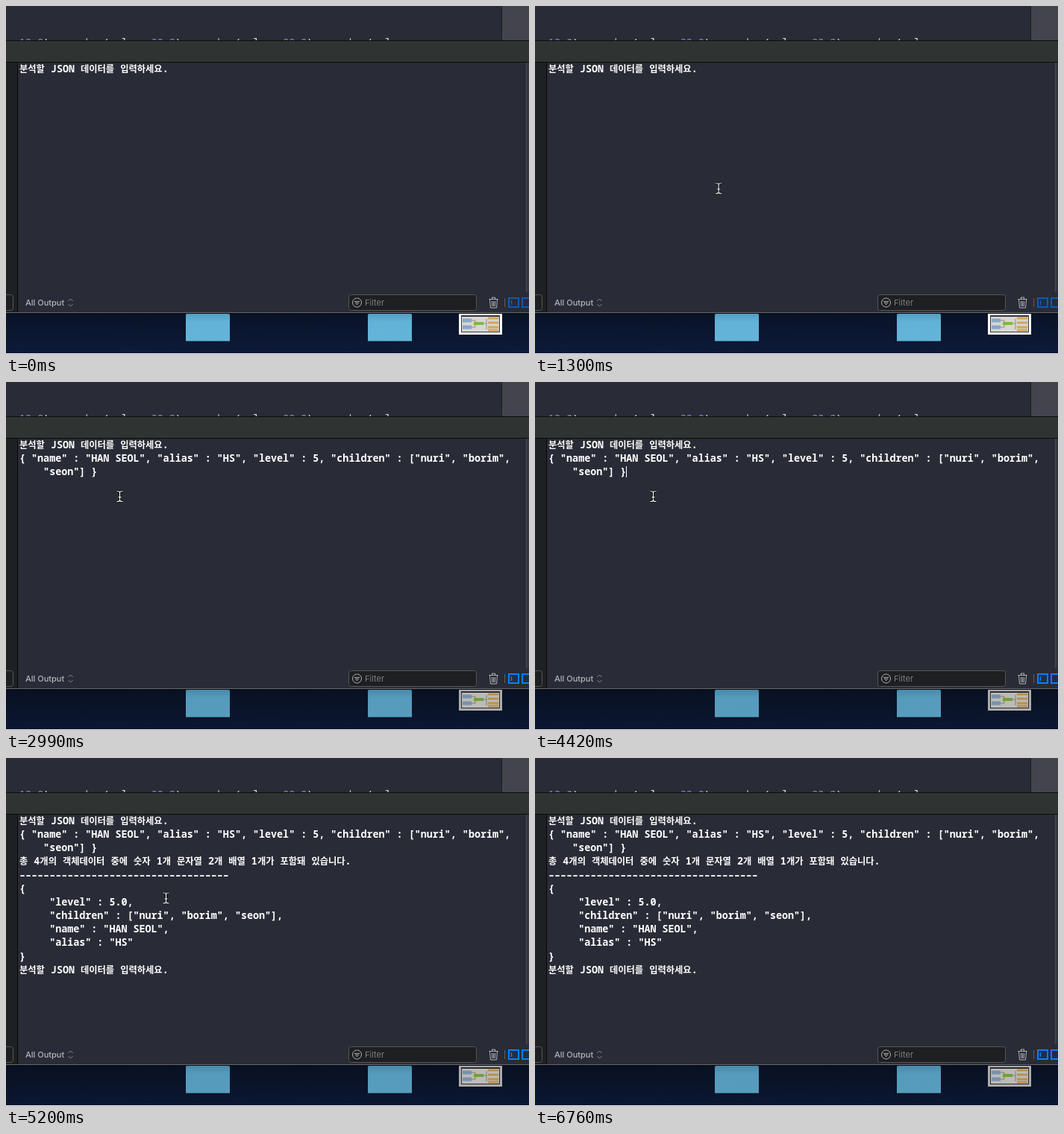
Animation of 701 by 467 pixels, one loop 6.89 s. Source, as an HTML page:

```html
<!DOCTYPE html>
<html lang="ko">
<head>
<meta charset="utf-8">
<title>Console session</title>
<style>
  html, body { margin: 0; width: 100%; height: 100%; overflow: hidden; background: #292c36; }
  #stage { position: relative; width: 701px; height: 467px; overflow: hidden; }
  #stage > * { position: absolute; }
  svg { left: 0; top: 0; }
  .mono, .code { font: 600 13.38px/18.17px "Noto Sans Mono", "DejaVu Sans Mono", monospace; white-space: pre; }
  .mono { left: 18px; top: 75px; color: #fff; }
  .mono div { height: 18.17px; }
  .mono .out { font-weight: 800; }
  .mono b { font: 700 12.28px/0 "Noto Sans CJK KR", "Noto Sans CJK JP", "Noto Sans CJK", sans-serif; }
  .code { left: 0; top: 0; width: 664px; height: 46px; overflow: hidden; color: #f2f2f4; font-weight: 500; }
  .code div { position: absolute; left: 2px; top: 39px; }
  .code i { font-style: normal; color: #8d86d6; }
  .code u { text-decoration: none; color: #b5c77a; }
  .ui { font: 500 11px/14px Inter, "Open Sans", sans-serif; top: 391px; color: #b3b5b9; }
  .pane { left: 16px; top: 76px; width: 681px; height: 335px; overflow: hidden; }
  .beam { position: absolute; left: -16px; top: -76px; overflow: visible; }
  .caret { width: 1px; height: 15px; background: #fff; }

  .typed, .reply, .caret, .focus, .thumb, .shade { animation: 6890ms step-end infinite; }
  .typed { animation-name: typed; }
  .reply { animation-name: reply; }
  .first { left: 122px; top: 113px; animation-name: first; }
  .second { left: 18px; top: 295px; animation-name: second; }
  .focus { animation-name: focus; }
  .thumb { animation-name: thumb; }
  .shade { animation-name: shade; }
  .beam { animation: move 6890ms linear infinite; }

  @keyframes typed { 0% { opacity: 0 } 32.075%, 100% { opacity: 1 } }
  @keyframes reply { 0% { opacity: 0 } 66.037%, 100% { opacity: 1 } }
  @keyframes first {
    0%, 37.735%, 54.716%, 66.037%, 100% { opacity: 0 }
    32.075%, 45.283%, 62.264% { opacity: 1 }
  }
  @keyframes second {
    0%, 75.471%, 92.452%, 100% { opacity: 0 }
    66.037%, 84.905% { opacity: 1 }
  }
  @keyframes focus { 0% { stroke: #0c5bb5 } 22.641%, 100% { stroke: #0a7dff } }
  @keyframes thumb { 0% { fill: #fff } 22.641%, 100% { fill: #c6c5c3 } }
  @keyframes shade { 0% { opacity: 0 } 22.641%, 100% { opacity: .13 } }
  /* the pointer advances once every 130 ms */
  @keyframes move {
    0% { transform: translate(330px, 480px); animation-timing-function: step-end }
    13.207% { transform: translate(318px, 390px); animation-timing-function: steps(2) }
    16.981% { transform: translate(269px, 267px); animation-timing-function: steps(5) }
    26.415% { transform: translate(152px, 153px); animation-timing-function: step-end }
    62.264% { transform: translate(152px, 153px); animation-timing-function: steps(1) }
    64.150% { transform: translate(158px, 153px); animation-timing-function: steps(2) }
    67.924% { transform: translate(169px, 159px); animation-timing-function: steps(8) }
    83.018% { transform: translate(259px, 216px); animation-timing-function: steps(6) }
    94.339%, 100% { transform: translate(370px, 480px); animation-timing-function: step-end }
  }
</style>
</head>
<body>
<div id="stage">
  <svg width="701" height="467">
    <defs>
      <linearGradient id="sky" x2="0" y2="1">
        <stop stop-color="#091123"/><stop offset="1" stop-color="#0d1a38"/>
      </linearGradient>
      <linearGradient id="folder" x2="0" y2="1">
        <stop stop-color="#529fc4"/><stop offset=".3" stop-color="#62b2d8"/><stop offset="1" stop-color="#66b3d8"/>
      </linearGradient>
      <pattern id="weave" width="4" height="4" patternUnits="userSpaceOnUse">
        <path d="M0 1h1M2 3h1" stroke="#14234a" stroke-opacity=".5"/>
      </pattern>
    </defs>

    <!-- editor edge, toolbar and gutters -->
    <rect x="664" width="37" height="46" fill="#43444e"/>
    <path d="M664.5 0V46" stroke="#1c1d22"/>
    <rect y="46" width="701" height="30" fill="#0a0b0b"/>
    <rect y="47" width="701" height="28" fill="#2f3433"/>
    <rect y="76" width="15" height="335" fill="#1f2023"/>
    <path d="M15.5 76V411" stroke="#060607"/>
    <rect x="697" y="76" width="4" height="308" fill="#34363f"/>
    <path d="M697.5 76V384" stroke="#4b4d55"/>

    <!-- bottom bar -->
    <g fill="#1e1f20" stroke="#535558">
      <rect x="-20.5" y="387.500" width="30" height="21" rx="3"/>
      <rect x="459.500" y="387.500" width="171" height="21" rx="3"/>
    </g>
    <g fill="none" stroke="#b0b2b5">
      <path d="M83.500 396l3-3 3 3M83.500 400l3 3 3-3" stroke="#8b8d92"/>
      <circle cx="470.500" cy="398" r="6"/>
      <path d="M467 396.500h7M468 398.500h5M469.500 400.500h2"/>
      <path d="M647.500 393.500h12M651.500 393v-2h4v2M648.500 394l1 11h8l1-11M651.500 396l.3 7M653.500 396v7M655.500 396l-.3 7"/>
      <path d="M668.500 392v12" stroke="#5b5d63"/>
    </g>
    <g class="focus" fill="none" stroke-width="2">
      <path d="M674 392h13v12h-13zM706 392h-14v12h14"/>
      <path d="M677.500 395v6" stroke-width="1.500"/>
    </g>

    <!-- desktop -->
    <rect y="411" width="701" height="56" fill="url(#sky)"/>
    <rect y="412" width="701" height="54" fill="url(#weave)"/>
    <path d="M0 411.500H701" stroke="#66696e"/>
    <path d="M0 412.500H701" stroke="#060a14"/>
    <g fill="url(#folder)">
      <rect x="241" y="413" width="59" height="37" rx="1.500"/>
      <rect x="485" y="413" width="59" height="37" rx="1.500"/>
    </g>
    <path d="M241 449.500h59M485 449.500h59" stroke="#3f86a9"/>
    <rect class="thumb" x="607" y="413" width="58" height="28"/>
    <rect x="610" y="415" width="52" height="23" fill="#34343a"/>
    <rect x="611" y="417" width="50" height="20" fill="#d8d7d3"/>
    <path d="M612 422h12M612 431h12" stroke="#87a9c8" stroke-width="5"/>
    <path d="M646 419h14M646 425h14M646 431h14M646 435h14" stroke="#d3a65c" stroke-width="3"/>
    <path d="M624 422h5v9h-5M640 426h4v-6M644 426v8" fill="none" stroke="#8c8d90"/>
    <rect x="627" y="424" width="13" height="4" fill="#82b840"/>
    <rect class="shade" y="413" width="701" height="53"/>
    <path d="M0 466.500H701" stroke="#e8e9ec"/>
  </svg>

  <div class="code"><div id="code"></div></div>
  <div class="mono" id="log"></div>
  <div class="caret first"></div>
  <div class="caret second"></div>
  <div class="ui" style="left:26px">All Output</div>
  <div class="ui" style="left:481px;color:#7c7f83;font-weight:400">Filter</div>

  <div class="pane">
    <svg class="beam" width="1" height="1" fill="none">
      <g id="bar"><path d="M-3.500-6.500Q0-6.500 .5-5Q1-6.500 4.500-6.500M-3.500 7.500Q0 7.500 .5 6Q1 7.500 4.500 7.500M.5-5V6M-1.500 1.500h4" stroke="#000" stroke-width="3"/></g>
      <path d="M-3.500-6.500Q0-6.500 .5-5Q1-6.500 4.500-6.500M-3.500 7.500Q0 7.500 .5 6Q1 7.500 4.500 7.500M.5-5V6M-1.500 1.500h4" stroke="#fff" stroke-width="1.200"/>
    </svg>
  </div>
</div>
<script>
  const prompt = '분석할 JSON 데이터를 입력하세요.';
  const blocks = [
    ['out', [prompt]],
    ['typed', [
      '{ "name" : "HAN SEOL", "alias" : "HS", "level" : 5, "children" : ["nuri", "borim",',
      '    "seon"] }'
    ]],
    ['out reply', [
      '총 4개의 객체데이터 중에 숫자 1개 문자열 2개 배열 1개가 포함돼 있습니다.',
      '–'.repeat(35),
      '{',
      '     "level" : 5.0,',
      '     "children" : ["nuri", "borim", "seon"],',
      '     "name" : "HAN SEOL",',
      '     "alias" : "HS"',
      '}',
      prompt
    ]]
  ];
  const hangul = text => text.replace(/[가-힣]+/g, '<b>$&</b>');
  document.getElementById('log').innerHTML = blocks.map(([name, lines]) =>
    lines.map(line => `<div class="${name}">${hangul(line)}</div>`).join('')).join('');

  const call = '    ma<u>k</u>e (value: ';
  const args = ['10.0', '20.0', '20.0'];
  document.getElementById('code').innerHTML =
    ': ' + args.map(n => `<i>${n}</i>)${call}`).join('');
</script>
</body>
</html>
```
